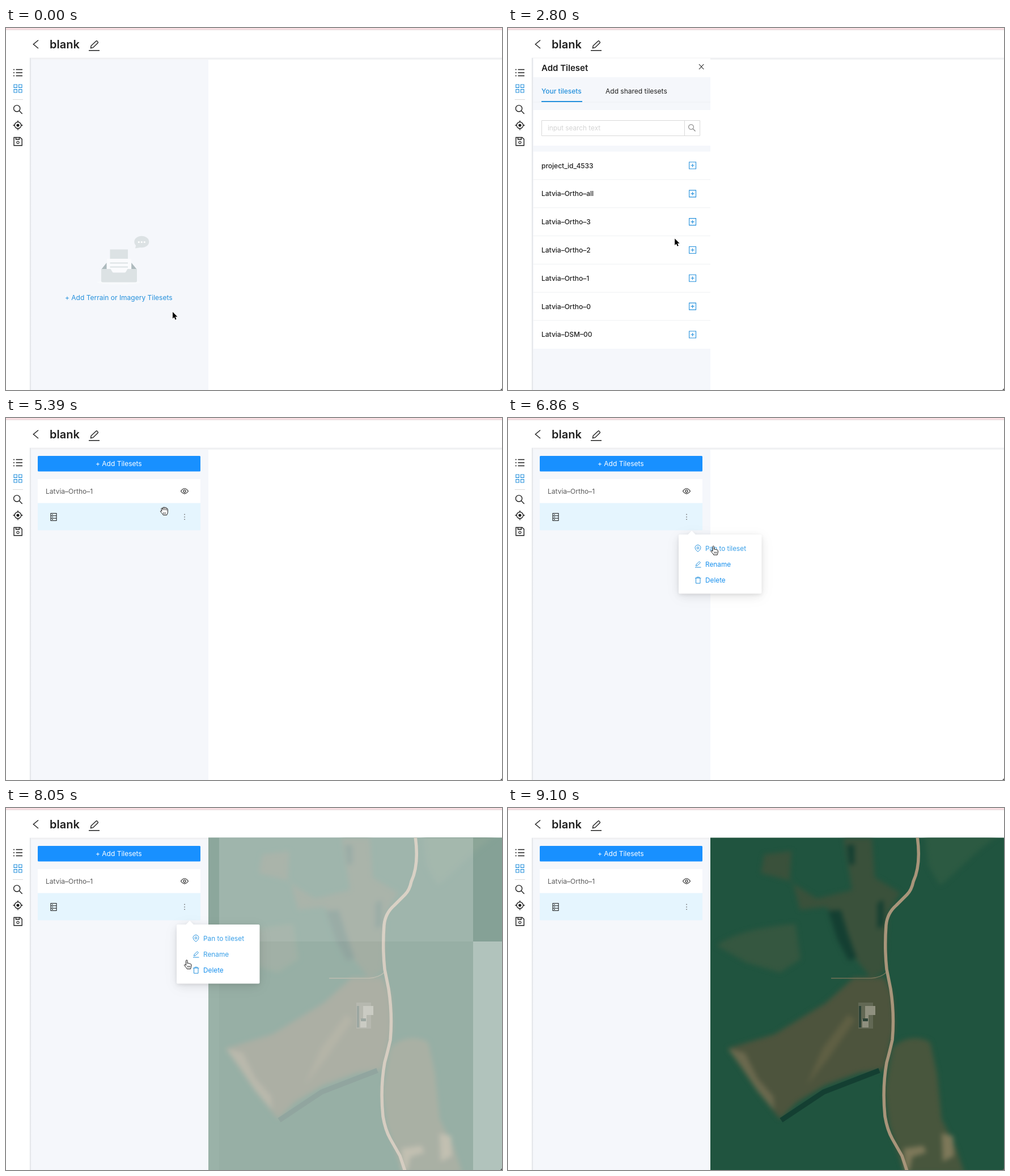
Animation, 875 px wide and 640 px high, one loop 9590 ms. Source, as an HTML page:

```html
<!DOCTYPE html>
<html lang="en">
<head>
<meta charset="utf-8">
<title>Add tileset</title>
<style>
  html, body { margin: 0; width: 100%; height: 100%; overflow: hidden; background: #fff; }
  svg { display: block; }
  text { font: 400 12px Inter, "Open Sans", sans-serif; fill: #1f1f1f; white-space: pre; }
  .title { font-size: 20px; font-weight: 600; }
  .head { font-size: 15px; font-weight: 600; }
  .row { font-weight: 500; }
  .link { fill: #2490dc; }
  .menu text { font-size: 11.8px; fill: #1890ee; }
  .menu .hover { fill: #389fe8; }
  .line { fill: none; stroke: #1f1f1f; stroke-width: 1.4; }
  .blue { stroke: #2490dc; }
  .thin { stroke-width: 1.1; }
  .card { filter: drop-shadow(0 2px 3px rgba(0,0,0,.08)) drop-shadow(0 4px 9px rgba(0,0,0,.08)) drop-shadow(0 5px 12px rgba(0,0,0,.04)); }
  .soft { filter: blur(4px); }
</style>
</head>
<body>
<svg width="875" height="640" viewBox="0 0 875 640">
  <defs>
    <clipPath id="view"><path d="M357 52.5h518V640H357z"/></clipPath>
    <linearGradient id="edge"><stop stop-color="#d6d9dd"/><stop offset=".35" stop-color="#eaecf0"/><stop offset="1" stop-color="#f5f7fb" stop-opacity="0"/></linearGradient>
  </defs>
  <path d="M0 0h875v640H0z" fill="#fff"/>

  <!-- header -->
  <path d="M0 0h875v2.6H0z" fill="#fde0e4"/>
  <path d="M0 2.6h875v1H0z" fill="#dcc6c9"/>
  <path d="M42 52.5h833v3.2H42z" fill="#eff0f2"/>
  <path class="line" d="M57 21.5 48.3 28.7 57 36"/>
  <text class="title" x="77" y="35.5">blank</text>
  <path class="line" d="M146 39.7h19M149.5 35.5l.6-4 8.7-8.3q1-.9 2 .1l1.2 1.3q.9 1-.1 2l-8.4 8.1z"/>

  <!-- side bar -->
  <path d="M43 55.5h314V640H43z" fill="#f5f7fb"/>
  <path class="line" d="M17.5 73.5H29M17.5 79H29M17.5 84.5H29M13 73.5h2M13 79h2M13 84.5h2"/>
  <path class="line blue thin" d="M14 100h5.4v5.4H14zM22.6 100H28v5.4h-5.4zM14 108.6h5.4v5.4H14zM22.6 108.6H28v5.4h-5.4z"/>
  <path d="M12 126h18v1H12z" fill="#d9d9d9"/>
  <path class="line" d="M23.5 146.5l5.2 5.2"/><circle class="line" cx="19.2" cy="142.2" r="5.6"/>
  <circle class="line" cx="21" cy="172" r="5.800"/><circle cx="21" cy="172" r="2.600" fill="#1f1f1f"/>
  <path class="line" d="M21 163.500v3M21 177.500v3M12.500 172h3M26.500 172h3"/>
  <path class="line" d="M14 193.500h11l3.200 3v11.200H14zM17.500 193.500v3.500h6v-3.500"/><circle class="line thin" cx="21" cy="202.300" r="2.100"/>

  <!-- empty state -->
  <g id="empty" fill="#dce2e4">
    <ellipse cx="199" cy="449.500" rx="38" ry="4" fill="#f8fafc"/>
    <path d="M178 408h43v24h-43z" fill="#fafbfd"/>
    <path d="M183.500 391.500H215V408h-31.500zM183.500 414.500H215v2h-31.500zM183.500 421.500H215v2h-31.500z"/>
    <path d="M168 427l9.500-12v12zM231 427l-9.800-12v12z" fill="#adbabd"/>
    <path d="M168 426h16.500l3 5q1 1.500 2.500 1.500h19q1.500 0 2.500-1.500l3-5H231v21q0 2.500-2.500 2.500h-58q-2.500 0-2.500-2.500z"/>
    <path d="M229.500 383l-1.500 6.500 9-1.500z"/><ellipse cx="239.300" cy="378" rx="13" ry="10.300"/>
    <g fill="#fff"><circle cx="234.300" cy="378.500" r="1.600"/><circle cx="239.300" cy="378.500" r="1.600"/><circle cx="244.300" cy="378.500" r="1.600"/></g>
    <text class="link" x="104" y="480.700">+ Add Terrain or Imagery Tilesets</text>
  </g>

  <!-- tileset picker -->
  <g id="picker">
    <path d="M43 53.500h314V87H43zM43 145h314v63H43z" fill="#fff"/>
    <path d="M43 130.500h314v1H43z" fill="#eef0f3"/>
    <text class="head" x="59" y="75.500">Add Tileset</text>
    <path class="line thin" d="M337 64l8.300 9M345.300 64l-8.300 9"/>
    <text class="row link" x="59" y="115.500">Your tilesets</text>
    <text x="172" y="115.500">Add shared tilesets</text>
    <path id="ink" d="M59 129h72v2H59z" fill="#2490dc"/>
    <path class="line" style="stroke:#d9d9d9;stroke-width:1" d="M59.500 163.500h279v27h-279zM311.500 163.500v27"/>
    <text x="70" y="181" style="font-size:11.8px;fill:#d4d4d4">input search text</text>
    <g class="line thin" style="stroke:#777"><circle cx="323" cy="175" r="4.300"/><path d="M326.200 178.200l4.300 4.300"/></g>
    <g id="load">
      <path d="M43 219h314v46H43z" fill="#f3f9fd"/>
      <g id="spin" fill="#b4dcf6"><circle cx="6.800" r="3"/><circle cx="-6.800" r="3"/><circle cy="6.800" r="3"/><circle cy="-6.800" r="3"/></g>
    </g>
    <g id="rows"></g>
  </g>

  <!-- added tileset -->
  <g id="added">
    <rect x="56" y="67" width="287" height="27.500" rx="1.500" fill="#1890ff"/>
    <text x="158" y="85" style="fill:#fff">+ Add Tilesets</text>
    <path d="M56 108h287v42.500H56z" fill="#fff"/>
    <path d="M56 150.500h287v48H56z" fill="#e5f5fe"/>
    <text x="70" y="133.700" style="fill:#5c5c5c">Latvia–Ortho–1</text>
    <path class="line thin" d="M308.500 129.300q6.500-9.200 13 0q-6.500 9.200-13 0z"/><circle class="line thin" cx="315" cy="129.300" r="2.100"/>
    <path class="line thin" d="M79 168.500h10v13H79zM79 172.800h10M79 177.200h10M81 170.700h2M81 175h2M81 179.400h2"/>
    <path d="M314.300 169.800h1.500v1.500h-1.500zM314.300 174.200h1.500v1.500h-1.500zM314.300 178.600h1.500v1.500h-1.500z" fill="#666"/>
  </g>
  <path d="M42 53h4v587h-4z" fill="url(#edge)"/>

  <!-- aerial view -->
  <g id="map" clip-path="url(#view)">
    <path d="M357 52h518v588H357z" fill="#20543f"/>
    <g class="soft">
      <path d="M735 45h133l-40 32-58 54-9 5-20-35z" fill="#2c5a42"/>
      <path d="M452 82l48-6-3 54 48 30 62-15-15-92h50l5 70 45 27-22 35-6 105-24 10-32-40-18-60-30-25-45 5-13-50-56-15z" fill="#3a513b"/>
      <path d="M368 243q40-30 139-38l9 62-36 24-60-18z" fill="#355740"/>
      <path d="M388 425l82-25 90-55 50-45h55l13 30 3 60-17 72-44 6-60 22-50 30-30 30-40-50z" fill="#4d543d"/>
      <path d="M388 425l30 8 22 45 28 32 2 25-30-35-30-45z" fill="#6b694e"/>
      <path d="M600 365l-45 60-28 65 40-50 45-65z" fill="#5f5f43"/>
      <path d="M678 425c18-22 52-22 67-10l12 55 8 80 25 50 15 45H700l-28-85-8-60z" fill="#48563d"/>
      <path d="M698 602l35-5 5 12-25 8-5 25h-8zM765 575l20 5 2 35-20 10z" fill="#7d7859"/>
      <path d="M565 182l22-2 12 40 16 45-14 5-20-38zM652 168l10-6 1 45-11 8zM598 65h13v35h-9z" fill="#143f32"/>
    </g>
    <path d="M482 552l75-50 98-38" fill="none" stroke="#143f32" stroke-width="9"/>
    <g fill="none" stroke="#a8957a" stroke-linejoin="round">
      <path stroke-width="1.500" stroke="#737257" d="M570 301h70q18-1 28-11"/>
      <path stroke-width="5.500" d="M722 50q7 50-7 80-3 15-11 23l-19 19q-16 14-18 35-3 40 1 78l7 35q7 45 3 90-5 22-10 40-8 45-3 95 4 24 13 40l17 30 10 30"/>
    </g>
    <path d="M618 344h26v46h-26z" fill="#626854"/>
    <path d="M630 350h18v16h-12v22h-11v-14h5z" fill="#8f907f"/>
    <path d="M619 350h4v38h-4zM626 372h9v5h-9z" fill="#2c4236"/>
    <g id="tiles" fill="#fff"></g>
  </g>

  <!-- context menu -->
  <g id="menu" class="menu">
    <path class="card" d="M303 206h14.500l6.700-6.700 6.700 6.700h114.600q2 0 2 2v100.500q0 2-2 2H303q-2 0-2-2V208q0-2 2-2z" fill="#fff"/>
    <text id="pan" x="348" y="234.800">Pan to tileset</text>
    <text id="rename" x="348" y="262.800">Rename</text>
    <text x="348" y="290.800">Delete</text>
    <g class="line blue" style="stroke-width:1">
      <path d="M335 236.500q-5-4-5-7a5 5 0 0 1 10 0q0 3-5 7z"/><circle cx="335" cy="229.700" r="1.800"/>
      <path d="M330 264h10.500M331.500 261.500l.5-2.500 5.500-5.300 2 2-5.500 5.300z"/>
      <path d="M330 283h10.500M333 283v-1.700h4.500v1.700M331.500 283v9.200h7.500V283"/>
    </g>
  </g>

  <path d="M875 637v3h-3z" fill="#555"/>

  <g id="cursor" stroke-linejoin="round">
    <path id="arrow" d="M0 0v11.800l2.700-2.500 1.900 4.400 2-.9-1.900-4.200h3.800z" stroke="#fff" stroke-width="1.600" paint-order="stroke"/>
    <g id="hand" fill="#fff" stroke="#111">
      <path d="M3.500 1.800c0-2 2.600-2 2.600 0v4.600c.3-1 2.300-.9 2.400.3.500-.8 2.200-.5 2.300.6.700-.5 2.100-.1 2.100 1.300v3.200c0 1.600-1.200 2-1.200 4.200H5.200c0-1.600-3.600-4.300-4.500-6.200-.6-1.400 1-2 1.900-1l.9 1z"/>
      <path stroke-width=".8" d="M6.500 10.500v3M8.500 10.500v3M10.500 10.500v3"/>
    </g>
    <g id="grab" fill="#fff" stroke="#111">
      <path d="M2.800 7L1.900 3.800c-.4-1.600 1.600-2 2-.6l.7 2V1.900c0-1.500 2.200-1.500 2.300 0c0-1.600 2.300-1.600 2.300.2c.2-1.200 2.200-1.100 2.200.5v1.200c.4-1 2-.7 2 .6v5c0 2.500-1.400 3.200-1.600 5.100H5.200C4.600 12 1.500 10.500.5 8.400c-.5-1.300 1-1.900 2.300-.4z"/>
      <path stroke-width=".8" d="M6.900 2v4M9.200 2.500v3.500M11.400 3.500v3M5.500 10v2.500M7.500 10v2.500M9.500 10v2.500"/>
    </g>
  </g>
</svg>

<script>
const LOOP = 9590, STEP = 70;
const $ = id => document.getElementById(id);
const ramp = (t, a, b) => Math.min(1, Math.max(0, (t - a) / (b - a)));
const ease = p => p * p * (3 - 2 * p);
const show = (id, on) => $(id).style.display = on ? '' : 'none';
const fade = (id, o) => { show(id, o > 0); $(id).style.opacity = o; };

const names = ['project_id_4533', 'Latvia–Ortho–all', 'Latvia–Ortho–3', 'Latvia–Ortho–2',
  'Latvia–Ortho–1', 'Latvia–Ortho–0', 'Latvia–DSM–00'];
$('rows').innerHTML = '<path d="M43 218.5h314V567H43z" fill="#fff"/>' + names.map((name, i) => {
  const y = 243 + 49.83 * i;
  return `<text class="row" x="59" y="${y + 4.5}">${name}</text>
    <path class="line blue thin" d="M319.7 ${y - 6}h11.8v12h-11.8zM322.5 ${y}h6.2M325.6 ${y - 3}v6"/>` +
    (i < 6 ? `<path d="M43 ${y + 24.4}h314v1H43z" fill="#eff1f3"/>` : '');
}).join('');

// White covers that clear tile by tile: x, y, width, height, start
const tiles = [
  [357, 52, 19, 184, 7895], [376, 52, 448, 184, 7920], [824, 52, 51, 184, 7885],
  [357, 236, 19, 404, 7915], [376, 236, 448, 404, 7910], [824, 236, 51, 404, 7945]
];
$('tiles').innerHTML = tiles.map(([x, y, w, h]) =>
  `<rect x="${x}" y="${y}" width="${w}" height="${h}"/>`).join('');
const covers = [...$('tiles').children];

// Pointer path: time, x, y
const path = [
  [0, 294, 502], [350, 272, 546], [980, 214, 463], [1050, 212.5, 479],
  [2170, 212.5, 479], [3080, 318, 341], [3500, 319, 481], [3990, 324, 439],
  [4340, 324, 439], [5250, 264, 150], [5320, 259, 148], [5390, 272, 157],
  [5670, 311, 172], [6230, 311, 172], [6370, 314, 176], [6510, 314, 176],
  [6790, 357.5, 226], [7280, 357.5, 226], [7770, 314, 268.5],
  [8540, 314, 268.5], [9030, 662, 597]
];
// Pointer shape from each time on
const shapes = [[0, 'arrow'], [840, 'hand'], [1190, 'arrow'], [3010, 'hand'], [3220, 'arrow'],
  [3430, 'hand'], [4410, 'arrow'], [5180, 'grab'], [5600, 'hand'], [8680, 'grab'], [9100, '']];

function pointer(t) {
  const i = path.findIndex(k => k[0] > t);
  if (i < 0) return path[path.length - 1].slice(1);
  const [ta, xa, ya] = path[i - 1], [tb, xb, yb] = path[i];
  const p = ease(ramp(t, ta, tb));
  return [xa + (xb - xa) * p, ya + (yb - ya) * p];
}

function draw(t) {
  show('empty', t < 1190);
  show('picker', t >= 1190 && t < 4410);
  show('added', t >= 4410);
  show('load', t >= 1330 && t < 2030);
  $('spin').setAttribute('transform', `translate(199.5 242) rotate(${-36 + (t - 1890) * .3})`);
  fade('rows', t < 2030 ? 0 : .5 + .5 * ramp(t, 2030, 2240));
  fade('ink', ramp(t, 2100, 2380));

  show('map', t >= 7910);
  covers.forEach((c, i) => c.setAttribute('opacity', 1 - ramp(t, tiles[i][4], tiles[i][4] + 300)));

  fade('menu', ramp(t, 5740, 5950) * (1 - ramp(t, 8680, 8890)));
  $('pan').classList.toggle('hover', t >= 6720);
  $('rename').classList.toggle('hover', t >= 7490);

  const shape = shapes.filter(s => s[0] <= t).pop()[1];
  for (const id of ['arrow', 'hand', 'grab']) show(id, id === shape);
  $('cursor').setAttribute('transform', `translate(${pointer(t)})`);
}

let start;
function tick(now) {
  start ??= now;
  draw(Math.floor((now - start) % LOOP / STEP) * STEP);
  requestAnimationFrame(tick);
}
draw(0);
requestAnimationFrame(tick);
</script>
</body>
</html>
```
